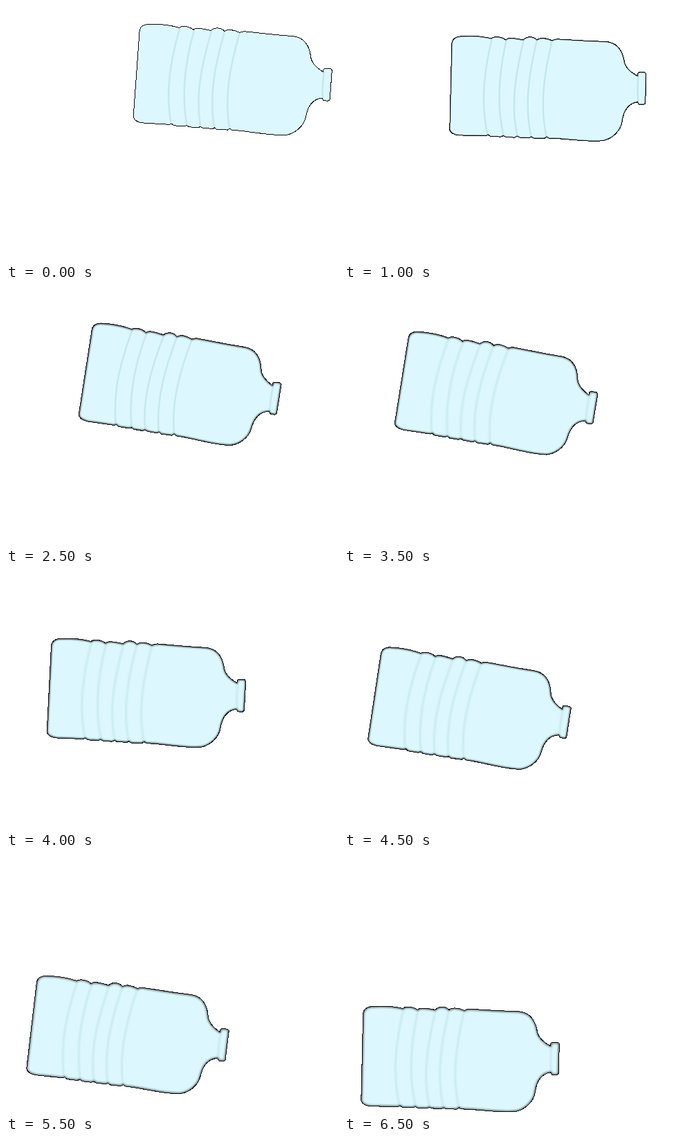
Recreate the animation shown at these times as an HTML page. Size 480 px wide and 370 px high, loop 7 s.

```html
<!DOCTYPE html>
<html lang="en">
<head>
<meta charset="utf-8">
<title>Rolling bottle</title>
<style>
  html, body { margin: 0; width: 100%; height: 100%; overflow: hidden; background: #fff; }
  svg { display: block; width: 480px; height: 370px; }
  path { fill: none; stroke-linejoin: round; }
  #body { fill: #dcf8fe; }
  #shade { stroke: #000; stroke-width: 2.4; }
  #ribs { stroke: #c5e6ed; stroke-width: 2.4; }
  #outline { stroke: #0a0a0a; stroke-width: 1; shape-rendering: crispEdges; }
</style>
</head>
<body>
<svg viewBox="0 0 480 370">
  <defs><clipPath id="inside"><path id="clip"/></clipPath></defs>
  <g id="bottle">
    <path id="body"/>
    <g clip-path="url(#inside)">
      <path id="ribs"/>
      <path id="shade"/>
    </g>
    <path id="outline"/>
  </g>
</svg>
<script>
const STEP = 500;
const PIVOT = [295, 119.5];

// pivot x, pivot y, tilt in degrees
const poses = [
  [328.8, 107.7, 2.7], [314.3, 117.9, 6], [295, 119.5, 0], [278.9, 121.2, 7.9],
  [270.7, 132, 4], [254.2, 139.5, 7.4], [234.2, 144.5, 4], [222.8, 152.5, 7.7],
  [203.6, 172.6, 1.5], [184, 197.3, 7.2], [174.9, 219.8, 0.7], [177.9, 258, 5.3],
  [153.5, 272.4, -0.7], [168.2, 290.6, -0.1]
];

const silhouette = `M156 56 Q156 45 169 44 Q190 42.5 206 45.5 L213 47
  Q215 44.5 222 44.8 T234 49 Q236 46.4 242 46.6 T259 49
  Q263 44.8 269 44.8 T279 49 Q282 46.4 288 46.6 T301 50
  Q304 47.6 310 48 L352 50.5 L378 51.5 C394 52.5 402 63 405 79
  C406 89 415 96 424 101 L424.5 97 Q426 95.5 430 95.7 L435 96 L436.7 98
  L435.5 140 Q435 142.7 431 142.5 L426 142 L424 138.8
  C410 141 404 152 402 167 C400 181 387 192 375 194.5 Q361 196 336 193.8
  L310 191.6 L296 191 L293 189 L290 191.2 L274 191 L271 189 L268 190.6
  L254 190 L250.5 188.3 L247 190 L234 189.5 L230.5 187.5 L227 189
  L212 188.5 L208.5 186 L206 187.4 L166 186.8 Q155 185.5 153 179 Z`;

const rib = ([topX, topY, endX, endY]) =>
  `M${topX} ${topY} C${topX - 11} ${topY + 46} ${endX - 11} ${endY - 47} ${endX} ${endY}`;

const ribs = [
  [214, 47, 208, 187], [235, 49, 231, 188], [260, 49, 251, 189],
  [279, 49, 271, 190], [301, 49, 293, 190]
].map(rib).join(" ") + " M425.5 99 Q423.5 119 425 139";

const el = id => document.getElementById(id);
for (const id of ["body", "clip", "shade", "outline"]) el(id).setAttribute("d", silhouette);
el("ribs").setAttribute("d", ribs);

let shown = -1;
function show(i) {
  if (i === shown) return;
  shown = i;
  const [x, y, tilt] = poses[i];
  el("bottle").setAttribute("transform",
    `translate(${x} ${y}) rotate(${tilt}) scale(${1 + 0.0008 * i}) translate(${-PIVOT[0]} ${-PIVOT[1]})`);
  // edges soften a little with every pose
  const blur = 0.44 * Math.sqrt(i);
  el("shade").style.filter = `blur(${blur}px)`;
  el("shade").style.opacity = 0.8 * Math.min(1, i / 4);
  el("ribs").style.filter = `blur(${0.3 + blur / 2}px)`;
}

const start = performance.now();
function tick() {
  const elapsed = performance.now() - start;
  show(Math.floor(elapsed / STEP) % poses.length);
  requestAnimationFrame(tick);
}
tick();
</script>
</body>
</html>
```
